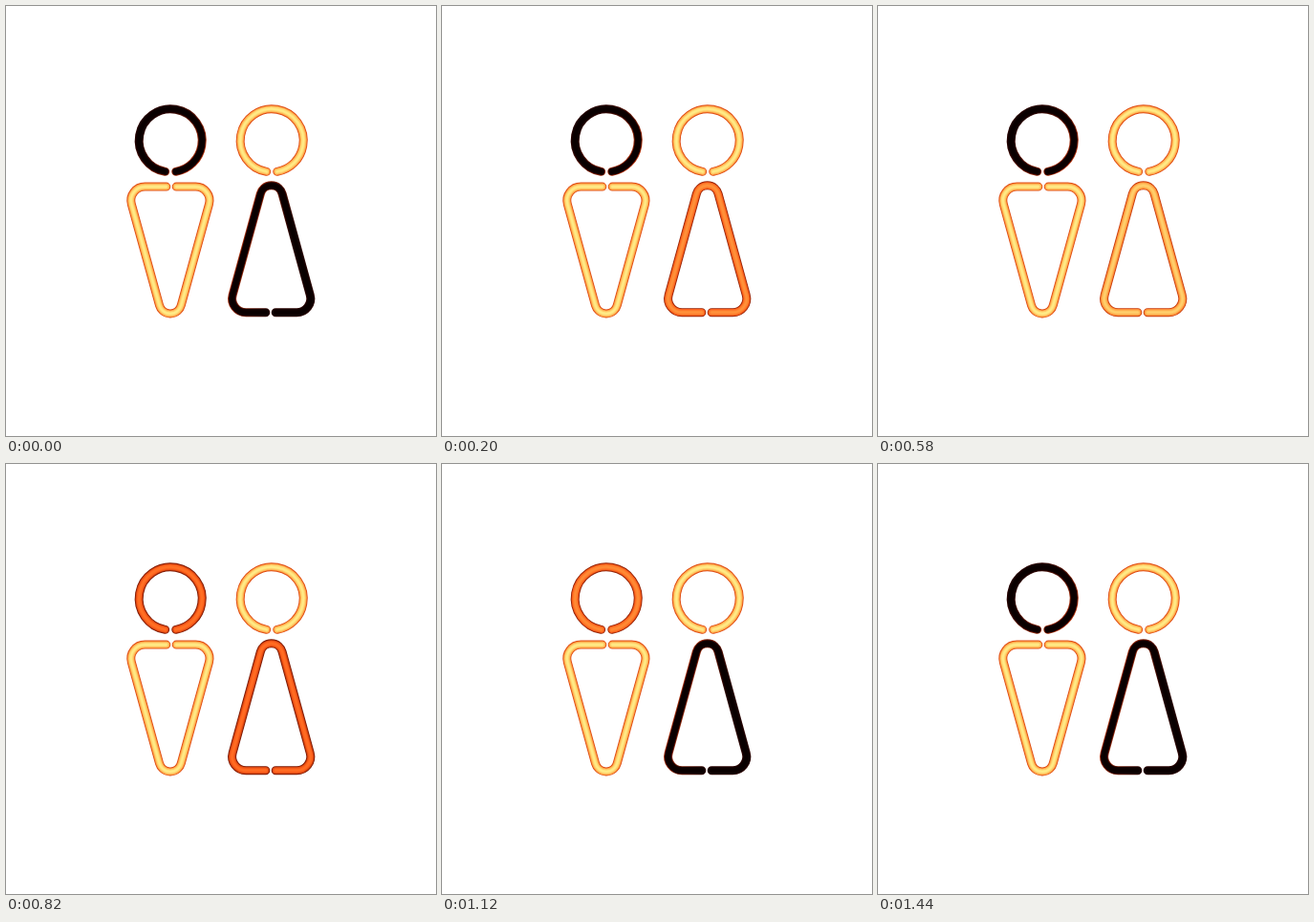
Recreate the animation shown at these times as an HTML page with a canvas. Size 450 px wide and 450 px high, loop 1460 ms.

```html
<!DOCTYPE html>
<html lang="en">
<head>
<meta charset="utf-8">
<title>Neon figures</title>
<style>
  html, body { margin: 0; width: 100%; height: 100%; overflow: hidden; background: #fff; }
  canvas { display: block; width: 450px; height: 450px; }
</style>
</head>
<body>
<canvas id="stage" width="450" height="450"></canvas>
<script>
const ctx = document.getElementById('stage').getContext('2d');
const SIZE = 450, LOOP = 1460, STEP = 20;
const TUBE_WIDTH = 9, LAYERS = 5;

const mix = (a, b, k) => a + (b - a) * k;

// Black-body style ramp: black, red, orange, pale yellow.
function heat(v) {
  const red = Math.min(255, 8 + 400 * v);
  const green = 242 * v ** 1.9;
  const blue = 140 * v ** 3.3;
  return `rgb(${red}, ${green}, ${blue})`;
}

function headPath(cx) {
  const path = new Path2D();
  const gap = 0.17;
  path.arc(cx, 140.8, 33, Math.PI / 2 + gap, Math.PI * 2.5 - gap);
  return path;
}

// Rounded triangle, open in the middle of its base; dir points base to tip.
function bodyPath(cx, gapX, baseY, dir) {
  const path = new Path2D();
  const halfBase = 45.6, height = 165.5, halfGap = 5.2;
  const cornerRadius = 14.5, tipRadius = 11.8;
  const left = cx - halfBase, right = cx + halfBase;
  const tipY = baseY + dir * height;
  path.moveTo(gapX - halfGap, baseY);
  path.arcTo(left, baseY, cx, tipY, cornerRadius);
  path.arcTo(cx, tipY, right, baseY, tipRadius);
  path.arcTo(right, baseY, gapX, baseY, cornerRadius);
  path.lineTo(gapX + halfGap, baseY);
  return path;
}

// Brightness of the two faulty tubes at shared key times.
const keyTimes = [0, 200, 440, 580, 820, 1120, 1440];
const headLevels = [0, 0, 0.8, 0, 0.46, 0.57, 0];
const skirtLevels = [0, 0.6, 0.94, 0.87, 0.44, 0, 0];

function flicker(levels) {
  return time => {
    const next = keyTimes.findIndex(key => key > time);
    if (next < 0) return levels[levels.length - 1];
    const k = (time - keyTimes[next - 1]) / (keyTimes[next] - keyTimes[next - 1]);
    return mix(levels[next - 1], levels[next], k);
  };
}

const steady = () => 0.99;

// glow: line along which a dark rim reflects its lit neighbours.
const tubes = [
  { path: headPath(172.2), level: flicker(headLevels), glow: [158, 120, 203, 160] },
  { path: headPath(278.2), level: steady },
  { path: bodyPath(171.9, 173, 189.1, 1), level: steady },
  { path: bodyPath(277.7, 277, 320.7, -1), level: flicker(skirtLevels), glow: [292, 262, 240, 248] }
];

function rimStyle(value, level, glow) {
  if (!glow) return heat(value);
  const gradient = ctx.createLinearGradient(...glow);
  gradient.addColorStop(0, heat(value));
  gradient.addColorStop(1, heat(value + 0.35 * Math.max(0, 1 - level / 0.4)));
  return gradient;
}

function drawTube({ path, level: levelAt, glow }, time) {
  const level = levelAt(time);
  const rim = 0.08 + 0.46 * level;
  const core = Math.sqrt(level);
  for (let i = 0; i < LAYERS; i++) {
    const radius = 1 - i / LAYERS;
    const depth = Math.sqrt(1 - radius * radius);
    const value = mix(rim, core, depth);
    ctx.lineWidth = TUBE_WIDTH * radius;
    ctx.strokeStyle = i === 0 ? rimStyle(value, level, glow) : heat(value);
    ctx.stroke(path);
  }
}

function draw(elapsed) {
  const time = Math.floor((elapsed % LOOP) / STEP) * STEP;
  ctx.fillStyle = '#fff';
  ctx.fillRect(0, 0, SIZE, SIZE);
  ctx.lineCap = 'round';
  for (const tube of tubes) drawTube(tube, time);
}

const start = performance.now();
function tick() {
  draw(performance.now() - start);
  requestAnimationFrame(tick);
}
tick();
</script>
</body>
</html>
```
